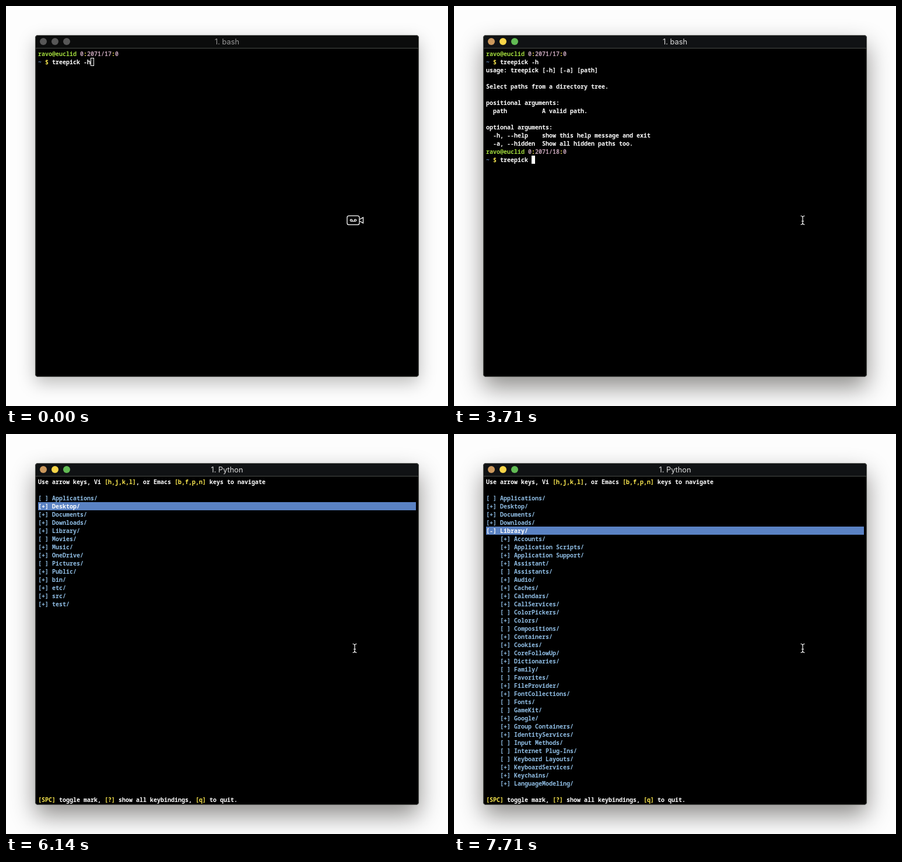
Recreate the animation shown at these times as an HTML page. Size 758 by 687 pixels, loop 8000 ms.

```html
<!DOCTYPE html>
<html lang="en">
<head>
<meta charset="utf-8">
<title>Terminal</title>
<style>
  html, body { margin: 0; width: 100%; height: 100%; overflow: hidden; background: #fdfdfd; }
  #window {
    position: absolute; left: 50px; top: 50px; width: 658px; height: 587px;
    border-radius: 5px; background: #000;
    box-shadow: 0 18px 40px rgba(8, 6, 0, .45), 0 0 1px rgba(0, 0, 0, .5);
  }
  #window.idle { box-shadow: 0 10px 30px rgba(8, 8, 0, .27), 0 0 1px rgba(0, 0, 0, .5); }
  #window::after {
    content: ""; position: absolute; inset: 0; border-radius: 5px;
    box-shadow: inset 0 0 0 1px #4c4e4a; pointer-events: none;
  }
  #bar {
    height: 22px; border-bottom: 1px solid #484b48; border-radius: 5px 5px 0 0;
    background: #101214; color: #dedede; text-align: center;
    font: 12.8px/23px Inter, Roboto, sans-serif;
  }
  .idle #bar { background: #0b0c0c; color: #999; }
  #bar i { position: absolute; top: 5px; width: 12px; height: 12px; border-radius: 50%; }
  #bar i:nth-of-type(1) { left: 8px; background: #cb985d; }
  #bar i:nth-of-type(2) { left: 28px; background: #f8d548; }
  #bar i:nth-of-type(3) { left: 48px; background: #62bb54; }
  #window.idle #bar i { background: #575757; }
  #screen {
    position: absolute; left: 55px; top: 75px; width: 648px; height: 560px; margin: 0;
    color: #fff; font: 600 10px/14px "Noto Sans Mono", "Liberation Mono", monospace;
    font-variant-ligatures: none;
  }
  #screen div { position: absolute; left: 0; width: 648px; height: 14px; white-space: pre; }
  #screen .selected { background: #5a82c3; color: #fff; }
  #cursor { position: absolute; width: 6px; height: 14px; box-sizing: border-box; border: 1px solid #fff; background: #fff; }
  #cursor.hollow { background: none; }
  .green { color: #a0d83c; }
  .mauve { color: #bd9db0; }
  .yellow { color: #fbe84f; }
  .blue { color: #6f9edb; }
  .dir { color: #8fbde4; }
  svg { position: absolute; left: 580px; top: 355px; fill: none; stroke: #fff; }
</style>
</head>
<body>
<div id="window">
  <div id="bar"><i></i><i></i><i></i><span id="title"></span></div>
</div>
<pre id="screen"></pre>
<svg width="40" height="26" viewBox="0 0 40 26">
  <g id="camera" stroke-width="1.3">
    <rect x="5" y="5.3" width="21" height="15.4" rx="3"/>
    <path d="M26.5 11.5L32.5 8.2V17.8L26.5 14.5M12 14.7H19"/>
    <circle cx="12" cy="13" r="1.7"/>
    <circle cx="19" cy="13" r="1.7"/>
  </g>
  <path id="beam" stroke-width="1.2" d="M14.5 5.5Q18 5.5 18 8.5Q18 5.5 21.5 5.5M18 8V18M14.5 20.5Q18 20.5 18 17.5Q18 20.5 21.5 20.5M16 14.5H20"/>
</svg>
<script>
const LOOP = 8000;
const $ = id => document.getElementById(id);
const ink = (color, text) => `<span class="${color}">${text}</span>`;
const keys = text => text.replace(/\[[^\]]+\]/g, m => ink("yellow", m));

const host = count => ink("green", "ravo@euclid") + " " +
  ["0", "2071/" + count, "0"].map(n => ink("mauve", n)).join(ink("yellow", ":"));
const prompt = typed => `${ink("blue", "~")} ${ink("yellow", "$")} ${typed}`;

const command = [host(17), prompt("treepick -h")];
const help = [
  ...command,
  "usage: treepick [-h] [-a] [path]",
  "",
  "Select paths from a directory tree.",
  "",
  "positional arguments:",
  "  path          A valid path.",
  "",
  "optional arguments:",
  "  -h, --help    show this help message and exit",
  "  -a, --hidden  Show all hidden paths too.",
  host(18),
];

// A leading "." marks an empty directory.
const home = (".Applications Desktop Documents Downloads Library .Movies Music OneDrive " +
  ".Pictures Public bin etc src test").split(" ");
const library = ("Accounts,Application Scripts,Application Support,Assistant,.Assistants,Audio," +
  "Caches,Calendars,CallServices,.ColorPickers,Colors,.Compositions,Containers,Cookies," +
  "CoreFollowUp,Dictionaries,.Family,.Favorites,FileProvider,FontCollections,.Fonts,.GameKit," +
  "Google,Group Containers,IdentityServices,.Input Methods,.Internet Plug-Ins," +
  ".Keyboard Layouts,KeyboardServices,Keychains,LanguageModeling").split(",");

const entry = name => name[0] === "." ? `[ ] ${name.slice(1)}/` : `[+] ${name}/`;

function tree(selected, open) {
  let items = home.map(entry);
  if (open) {
    items = [
      ...items.slice(0, selected),
      items[selected].replace("+", "-"),
      ...library.map(name => "    " + entry(name)),
    ];
  }
  const rows = [keys("Use arrow keys, Vi [h,j,k,l], or Emacs [b,f,p,n] keys to navigate"), ""];
  items.forEach((item, i) => rows.push(i === selected ? item : ink("dir", item)));
  rows[39] = keys("[SPC] toggle mark, [?] show all keybindings, [q] to quit.");
  return { rows, selected: selected + 2 };
}

const typing = text => ({ rows: [...help, prompt(text)], cursor: [4 + text.length, 13] });

const steps = [
  [0, { rows: command, cursor: [15, 1], idle: true }],
  [70, { rows: command, cursor: [15, 1] }],
  [570, { rows: command, cursor: [0, 2] }],
  [860, typing("")],
  [2790, typing("t")],
  [2930, typing("tr")],
  [3070, typing("tre")],
  [3210, typing("tree")],
  [3570, typing("treep")],
  [3710, typing("treepick ")],
  [4290, { ...typing("treepick "), cursor: [0, 14] }],
  [4640, { rows: [] }],
  [4710, tree(0)],
  [4930, { ...tree(0), title: "1. Python" }],
  [6140, { ...tree(1), title: "1. Python" }],
  [6360, { ...tree(2), title: "1. Python" }],
  [6500, { ...tree(3), title: "1. Python" }],
  [6640, { ...tree(4), title: "1. Python" }],
  [7710, { ...tree(4, true), title: "1. Python" }],
];

function render({ rows, cursor, selected, idle = false, title = "1. bash" }) {
  let html = "";
  rows.forEach((row, i) => {
    const mark = i === selected ? ' class="selected"' : "";
    if (row) html += `<div${mark} style="top:${i * 14}px">${row}</div>`;
  });
  if (cursor) {
    const [col, line] = cursor;
    html += `<span id="cursor" class="${idle ? "hollow" : ""}" style="left:${col * 6}px;top:${line * 14}px"></span>`;
  }
  $("screen").innerHTML = html;
  $("title").textContent = title;
  $("window").classList.toggle("idle", idle);
  $("camera").style.display = idle ? "" : "none";
  $("beam").style.display = idle ? "none" : "";
}

let start, shown;
function tick(now) {
  start ??= now;
  const time = (now - start) % LOOP;
  const step = steps.findLast(([at]) => at <= time);
  if (step !== shown) render((shown = step)[1]);
  requestAnimationFrame(tick);
}
render((shown = steps[0])[1]);
requestAnimationFrame(tick);
</script>
</body>
</html>
```
